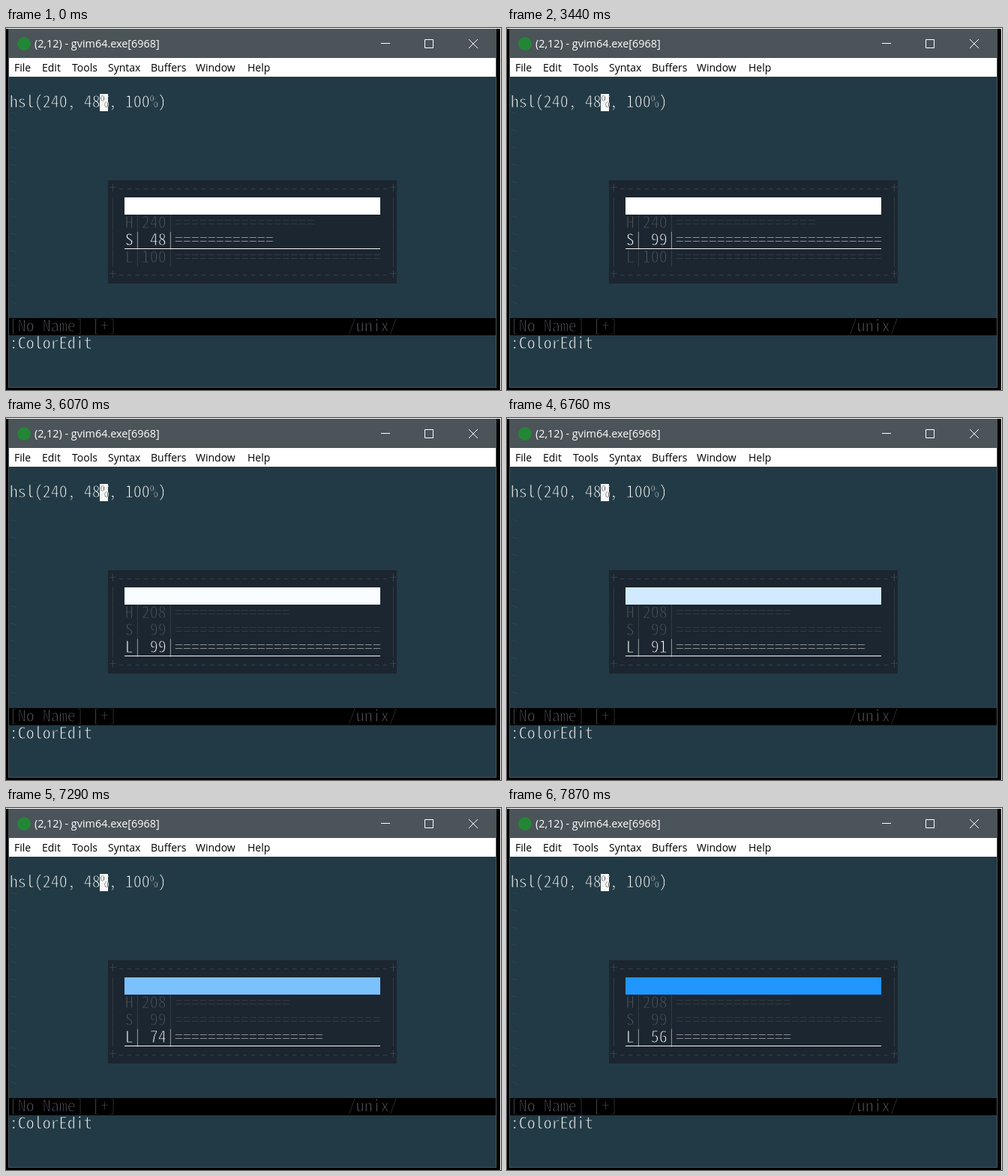
An HTML page that plays this animation: 660 px wide and 483 px high, repeating every 8 s.

```html
<!DOCTYPE html>
<html lang="en">
<head>
<meta charset="utf-8">
<title>Color editor</title>
<style>
  html, body { margin: 0; width: 100%; height: 100%; overflow: hidden; background: #000; }
  svg { display: block; }
  text { white-space: pre; }
  /* The paper-coloured outline thins the strokes of the regular weight. */
  .term {
    font: 300 22px "Noto Sans Mono CJK JP", "Noto Sans Mono", "Liberation Mono", monospace;
    font-variant-ligatures: none;
    stroke-width: 0.85px;
  }
  .ui { font-family: "Open Sans", "Noto Sans", sans-serif; }
</style>
</head>
<body>
<svg id="stage" width="660" height="483" viewBox="0 0 660 483"></svg>
<script>
const LOOP = 8000, CELL = 11, LINE = 23, LEFT = 4, TOP = 65;
const LIGHT = '#f8f8f8', DIM = '#4a5157', GREY = '#54545c';
const BACK = '#223a45', PANEL = '#1c2630', BLACK = '#000';
const POPUP = { col: 12, row: 6, cols: 35, rows: 6 };
const BAR_CELLS = 25;

// Each step: time, then the properties that change.
const steps = [
  [0, { H: 240, S: 48, L: 100, pick: 'S', cursor: true }],
  [740, { cursor: false }],
  [870, { S: 49, cursor: true }],
  ...run('S', 1460, 140, [52, 56, 61, 65, 70, 74, 79, 83]),
  ...run('S', 2610, 140, [88, 92, 97, 100]),
  [3440, { S: 99 }],
  [3720, { pick: 'H' }],
  [4010, { H: 239 }],
  ...run('H', 4580, 136, [236, 232, 228, 223, 219, 215, 211, 208]),
  [5660, { pick: 'S' }],
  [5860, { pick: 'L' }],
  [6070, { L: 99 }],
  [6600, { L: 96 }],
  ...run('L', 6760, 133, [91, 87, 83, 78]),
  [7290, { L: 74 }],
  [7440, { L: 69 }],
  [7570, { L: 65, cursor: false }],
  [7720, { L: 61, cursor: true }],
  [7870, { L: 56 }],
];

function run(name, start, gap, values) {
  return values.map((value, i) => [start + i * gap, { [name]: value }]);
}

const stage = document.getElementById('stage');
const colX = col => LEFT + col * CELL;
const rowY = row => TOP + row * LINE;

function add(tag, attrs, content = '') {
  const node = document.createElementNS(stage.namespaceURI, tag);
  for (const key in attrs) node.setAttribute(key, attrs[key]);
  node.textContent = content;
  return stage.appendChild(node);
}
const rect = (x, y, width, height, fill) => add('rect', { x, y, width, height, fill });
const label = (x, y, size, content, fill) =>
  add('text', { x, y, fill, class: 'ui', 'font-size': size }, content);
const print = (col, row, content, ink, paper, baseline = 18) =>
  add('text', { x: colX(col) + 0.7, y: rowY(row) + baseline, fill: ink, stroke: paper, class: 'term' }, content);

function drawWindow() {
  rect(0, 0, 660, 1, '#fff');
  rect(659, 0, 1, 483, '#fff');
  rect(3, 1, 651, 479, '#4b5458');
  rect(4, 40, 649, 25, '#fff');
  rect(4, TOP, 649, 414, BACK);
  add('circle', { cx: 24, cy: 21, r: 9, fill: '#238636' });
  label(38, 26, 14.4, '(2,12) - gvim64.exe[6968]', '#fff');
  add('path', {
    d: 'M500 20.5h12M558.5 15.5h11v11h-11zM617 15l12 12m0-12l-12 12',
    fill: 'none', stroke: '#fff',
  });
  const menu = { File: 11, Edit: 48, Tools: 88, Syntax: 136, Buffers: 193, Window: 253, Help: 322 };
  for (const name in menu) label(menu[name], 58, 14, name, BLACK);
}

function drawEditor() {
  print(0, 1, 'hsl(240, 48%, 100%)', LIGHT, BACK);
  for (let row = 2; row < 14; row++) print(0, row, '~', '#384b58', BACK, 11);
  rect(LEFT, rowY(14), 649, LINE, BLACK);
  print(0, 14, '[No Name] [+]', GREY, BLACK);
  print(41, 14, '/unix/', GREY, BLACK);
  print(0, 15, ':ColorEdit', LIGHT, BACK);
}

function drawPopup() {
  const { col, row, cols, rows } = POPUP;
  rect(colX(col), rowY(row), cols * CELL, rows * LINE, PANEL);
  const edge = '+' + '-'.repeat(cols - 2) + '+';
  print(col, row, edge, DIM, PANEL);
  print(col, row + rows - 1, edge, DIM, PANEL);
  for (let i = 1; i < rows - 1; i++) {
    print(col, row + i, '|', DIM, PANEL);
    print(col + cols - 1, row + i, '|', DIM, PANEL);
  }
}

drawWindow();
drawEditor();
drawPopup();

const cursor = [rect(colX(11), rowY(1), CELL, LINE, LIGHT), print(11, 1, '%', BLACK, LIGHT)];
const innerCol = POPUP.col + 2, innerWidth = 31 * CELL;
const channels = [['H', 360], ['S', 100], ['L', 100]].map(([name, max], i) =>
  ({ name, max, row: 8 + i, node: print(innerCol, 8 + i, '', DIM, PANEL) }));
const swatch = rect(colX(innerCol), rowY(7), innerWidth, LINE, '#fff');
const underline = rect(colX(innerCol), 0, innerWidth, 1, LIGHT);

function barLength(value, max) {
  const percent = Math.round(value / max * 100);
  return Math.ceil(percent / 100 * BAR_CELLS - 0.5);
}

function render(time) {
  const state = Object.assign({}, ...steps.filter(step => step[0] <= time).map(step => step[1]));
  for (const { name, max, row, node } of channels) {
    const value = state[name], active = state.pick === name;
    node.textContent = `${name}|${String(value).padStart(3)}|${'='.repeat(barLength(value, max))}`;
    node.setAttribute('fill', active ? LIGHT : DIM);
    if (active) underline.setAttribute('y', rowY(row + 1) - 1);
  }
  swatch.setAttribute('fill', `hsl(${state.H}, ${state.S}%, ${state.L}%)`);
  for (const node of cursor) node.setAttribute('visibility', state.cursor ? 'visible' : 'hidden');
}

const start = performance.now();
function tick() {
  render((performance.now() - start) % LOOP);
  requestAnimationFrame(tick);
}
tick();
</script>
</body>
</html>
```
